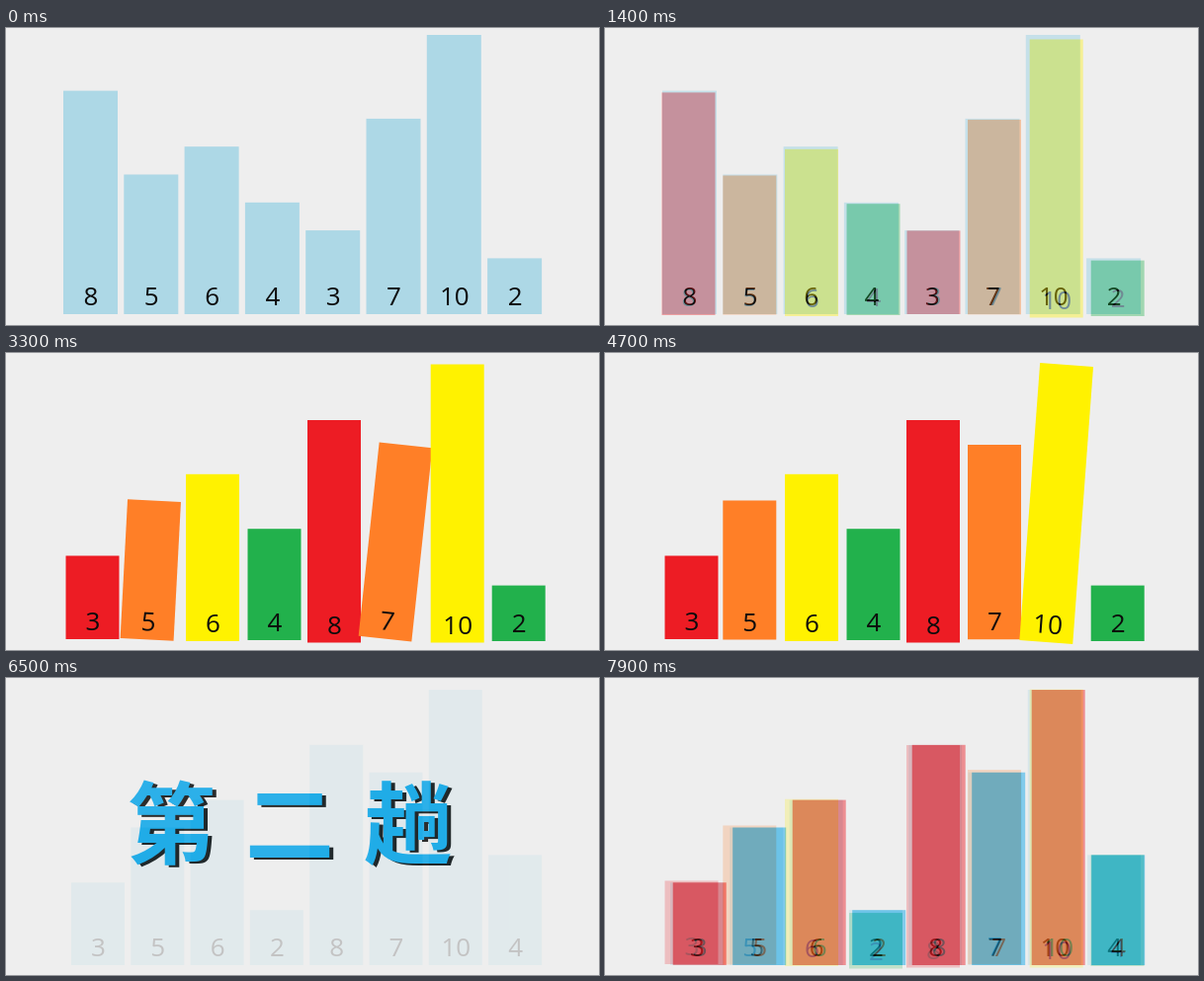
An HTML page for the animation above (8000 ms loop, 600x301 px).

```html
<!DOCTYPE html>
<html lang="zh">
<head>
<meta charset="utf-8">
<title>排序</title>
<style>
  html, body { margin: 0; width: 100%; height: 100%; overflow: hidden; background: #eee; }
  svg { display: block; width: 100vw; height: 100vh; }
  text { font: 26px "Open Sans", "Noto Sans", sans-serif; text-anchor: middle; fill: #0c0c0c; }
  .title { font: bold 90px "Noto Sans CJK SC", "Noto Sans CJK", sans-serif; letter-spacing: 30px; text-anchor: start; }
</style>
</head>
<body>
<svg id="stage" viewBox="0 0 600 301" preserveAspectRatio="none"></svg>
<script>
const LOOP = 8000;
const BG = '#eee', PALE = '#add8e6', RED = '#ed1c24', ORANGE = '#ff7f27',
      YELLOW = '#fff200', GREEN = '#22b14c', SKY = '#00a2e8', INK = '#000';
const stage = document.getElementById('stage');

function add(parent, name, attrs = {}) {
  const el = document.createElementNS('http://www.w3.org/2000/svg', name);
  for (const key in attrs) el.setAttribute(key, attrs[key]);
  return parent.appendChild(el);
}

// Opaque sheet, so that its opacity cross-fades with what lies below
function addLayer() {
  const g = add(stage, 'g');
  add(g, 'rect', { width: 600, height: 301, fill: BG });
  return g;
}

function addBar(layer, value, x, bottom, width, unit, fill) {
  const h = value * unit;
  const g = add(layer, 'g');
  add(g, 'rect', { y: -h, width, height: h, fill });
  add(g, 'text', { x: width / 2 + 0.5, y: -9 }).textContent = value;
  const place = (px, py, angle = 0) =>
    g.setAttribute('transform', `translate(${px} ${py}) rotate(${angle} ${width / 2} ${-h / 2})`);
  place(x, bottom);
  return place;
}

function addRow(values, x, step, bottom, width, unit, colours) {
  const layer = addLayer();
  values.forEach((v, i) =>
    addBar(layer, v, x + step * i, bottom, width, unit, colours[i % colours.length]));
  return layer;
}

function addTitle(words) {
  const layer = addLayer();
  for (const [fill, shift] of [[INK, 4], [SKY, 0]])
    add(layer, 'text', { class: 'title', x: 122 + shift, y: 181 + shift / 2, style: `fill: ${fill}` })
      .textContent = words;
  return layer;
}

const ramp = (t, start, end) => Math.min(1, Math.max(0, (t - start) / (end - start)));

// swap: x, bottom, start time; lean: start time
const SORTED = [
  { v: 8, x: 57.5, y: 291, c: RED, swap: [305, 293.5, 2400], lean: 1800 },
  { v: 5, x: 119.3, y: 290.5, c: ORANGE, lean: 2883 },
  { v: 6, x: 182, y: 292, c: YELLOW, lean: 4100 },
  { v: 4, x: 244.5, y: 291, c: GREEN, swap: [491.5, 292, 4780] },
  { v: 3, x: 305.5, y: 290, c: RED, swap: [60.5, 290, 2400], lean: 1970 },
  { v: 7, x: 367, y: 290.3, c: ORANGE, lean: 3050 },
  { v: 10, x: 429.7, y: 293.5, c: YELLOW, lean: 4323 },
  { v: 2, x: 491.7, y: 292, c: GREEN, swap: [247, 294.5, 4780] }
];

function addSorted() {
  const layer = addLayer();
  const places = SORTED.map(b => addBar(layer, b.v, b.x, b.y, 54, 28.2, b.c));
  const pose = t => SORTED.forEach((b, i) => {
    const [x, y, start] = b.swap || [b.x, b.y, 0];
    const k = ramp(t, start, start + 400);
    const angle = b.lean ? 6.1 * Math.sin(Math.PI * ramp(t, b.lean, b.lean + 500)) : 0;
    places[i](b.x + (x - b.x) * k, b.y + (y - b.y) * k, angle);
  });
  return { layer, pose };
}

const before = [8, 5, 6, 4, 3, 7, 10, 2], after = [3, 5, 6, 2, 8, 7, 10, 4];
addRow(before, 58, 61.3, 290, 55, 28.3, [PALE]);
const titleOne = addTitle('第一趟');
const passOne = addSorted();
const paleTwo = addRow(after, 66, 60.3, 291, 54, 27.9, [PALE]);
const titleTwo = addTitle('第二趟');
const again = addSorted();
again.pose(LOOP);
const passTwo = addRow(after, 68.7, 60.5, 291, 54, 27.9, [RED, SKY]);

// layer, start of fade in, start of fade out
const FADE = 500;
const FADES = [
  [titleOne, 50, 700],
  [passOne.layer, 1215],
  [paleTwo, 5180],
  [titleTwo, 6095, 7150],
  [again.layer, 7700],
  [passTwo, 7675]
];

function render(t) {
  for (const [layer, show, hide = LOOP] of FADES) {
    const o = ramp(t, show, show + FADE) - ramp(t, hide, hide + FADE);
    layer.setAttribute('opacity', o);
    layer.setAttribute('visibility', o > 0 ? 'visible' : 'hidden');
  }
  passOne.pose(t);
}

const begin = performance.now();
function tick() {
  render((performance.now() - begin) % LOOP);
  requestAnimationFrame(tick);
}
tick();
</script>
</body>
</html>
```
